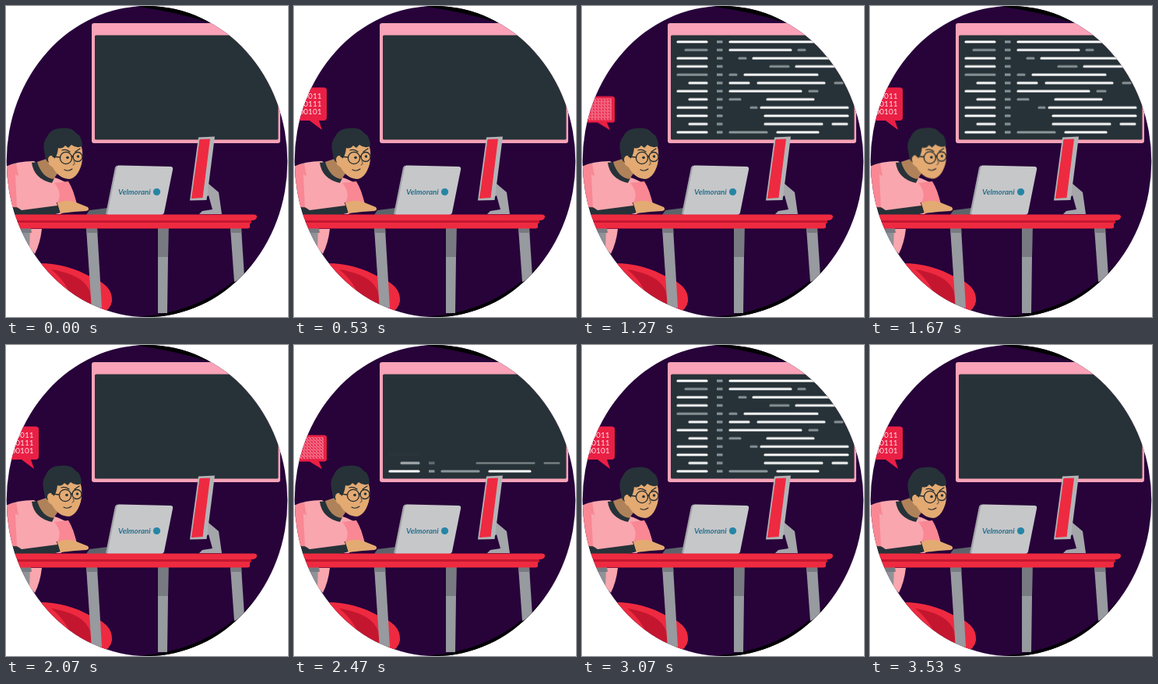
An HTML page without scripts that plays this animation: 362x399 px, repeating every 3.59 s.

```html
<!DOCTYPE html>
<html lang="en">
<head>
<meta charset="utf-8">
<title>Coder at a desk</title>
<style>
  html, body { margin: 0; width: 100%; height: 100%; overflow: hidden; background: #fff; }
  svg { display: block; width: 100%; height: 100%; }

  .w, .g { fill: none; stroke-width: 3.2; stroke-linecap: round; }
  .w { stroke: #fff; }
  .g { stroke: #8c9599; }
  .red { fill: #ee2a40; }
  .deep { fill: #c4172f; }
  .skin { fill: #e3aa72; }
  .shirt { fill: #f9a6ae; }
  .shade { fill: #f98794; }
  .dark { fill: #263238; }
  .ink { fill: none; stroke: #222b31; stroke-linecap: round; }
  .digits { font: 10px Lato, sans-serif; fill: #ffdfe5; text-anchor: end; }
  .brand { font: italic 700 9.8px Lato, sans-serif; fill: #28708c; }

  /* code lines: written bottom to top, wiped at once */
  .code { animation: wipe 1795ms step-end infinite; }
  .row { animation: show 1795ms calc(var(--i) * 50ms) linear infinite backwards; }
  .row .end {
    transform-box: fill-box; transform-origin: center;
    animation: grow 1795ms calc(var(--i) * 50ms) linear infinite backwards;
  }
  @keyframes wipe { 0%, 96.6% { visibility: hidden; } 31.9% { visibility: visible; } }
  @keyframes show { 0%, 32% { opacity: 0; } 34.8% { opacity: .6; } 35.6%, 100% { opacity: 1; } }
  @keyframes grow { 0%, 33% { transform: scaleY(0); } 36.5%, 100% { transform: none; } }

  /* speech bubble: pops up from its tail, then shows digits */
  .bubble { transform-origin: 33px 160px; animation: pop 1196.67ms linear infinite; }
  .noise { animation: noise 1196.67ms step-end infinite; }
  .digits { animation: digits 1196.67ms step-end infinite; }
  @keyframes pop {
    0%, 5% { transform: scaleY(0); }
    5.01% { transform: scaleY(.78); }
    6.3% { transform: scaleY(.8); }
    18%, 100% { transform: none; }
  }
  @keyframes noise { 0% { opacity: 1; } 22% { opacity: 0; } }
  @keyframes digits { 0% { opacity: 0; } 22% { opacity: 1; } }

  .head { animation: nod 3590ms ease-in-out infinite; }
  @keyframes nod {
    0%, 42%, 82%, 100% { transform: none; }
    56%, 70% { transform: translate(-1px, -2px); }
  }
</style>
</head>
<body>
<svg viewBox="0 0 362 399" preserveAspectRatio="none">
  <defs>
    <clipPath id="stage"><ellipse cx="181" cy="199.5" rx="180.3" ry="199.5"/></clipPath>
    <clipPath id="glass"><path d="M114 38H349V171H114Z"/></clipPath>
    <pattern id="hatch" width="4" height="5" patternUnits="userSpaceOnUse">
      <path d="M0 1L4 4M0 4L2 5" fill="none" stroke="#f9a0b2" stroke-width="1.2"/>
    </pattern>
    <path id="tag" class="g" style="stroke-linecap:butt" d="M173 0H180.500"/>
    <path id="wide" class="w" d="M123 0H160"/>
    <path id="short" class="w" d="M138 0H160"/>
  </defs>

  <g clip-path="url(#stage)">
    <path fill="#27033a" d="M0 0H362V399H0Z"/>
    <path d="M165 0A180.3 199.5 0 0 1 264 22Q216 7 165 0ZM165 399A180.3 199.5 0 0 0 320 326Q262 394 165 399Z"/>

    <!-- wall screen -->
    <rect x="110" y="22" width="242" height="154" rx="3" fill="#f9a2b8"/>
    <rect x="114" y="37.500" width="235.500" height="134" rx="1.5" class="dark"/>
    <g clip-path="url(#glass)"><g class="code">
      <g transform="translate(0 162)"><g class="row" style="--i:0"><use href="#wide"/><use href="#tag"/>
        <path class="g" d="M190 0H237"/><path class="w end" d="M251 0H303"/></g></g>
      <g transform="translate(0 151.4)"><g class="row" style="--i:1"><use href="#short"/><use href="#tag"/>
        <path class="w end" d="M235 0H308M322 0H340"/></g></g>
      <g transform="translate(0 140.9)"><g class="row" style="--i:2"><use href="#wide"/><use href="#tag"/>
        <path class="w end" d="M235 0H341"/></g></g>
      <g transform="translate(0 130.4)"><g class="row" style="--i:3"><use href="#wide"/><use href="#tag"/>
        <path class="g" d="M217 0H224"/><path class="w end" d="M230 0H341"/></g></g>
      <g transform="translate(0 119.8)"><g class="row" style="--i:4"><use href="#short"/><use href="#tag"/>
        <path class="g" d="M190 0H203"/><path class="w end" d="M238 0H297"/></g></g>
      <g transform="translate(0 109.3)"><g class="row" style="--i:5"><use href="#wide"/><use href="#tag"/>
        <path class="w end" d="M190 0H281"/><path class="g" d="M292 0H302"/></g></g>
      <g transform="translate(0 98.7)"><g class="row" style="--i:6"><use href="#short"/><use href="#tag"/>
        <path class="w end" d="M190 0H214M226 0H311"/><path class="g" d="M325 0H334"/></g></g>
      <g transform="translate(0 88.2)"><g class="row" style="--i:7"><path class="g" d="M123 0H160"/><use href="#tag"/>
        <path class="g" d="M190 0H198"/><path class="w end" d="M209 0H302"/></g></g>
      <g transform="translate(0 77.6)"><g class="row" style="--i:8"><use href="#wide"/><use href="#tag"/>
        <path class="g" d="M242 0H265"/><path class="w end" d="M275 0H342"/></g></g>
      <g transform="translate(0 67.1)"><g class="row" style="--i:9"><use href="#wide"/><use href="#tag"/>
        <path class="g" d="M202 0H210"/><path class="w end" d="M220 0H321"/></g></g>
      <g transform="translate(0 56.5)"><g class="row" style="--i:10"><path class="g" d="M133 0H160"/><use href="#tag"/>
        <path class="w end" d="M190 0H268"/><path class="g" d="M278 0H286"/></g></g>
      <g transform="translate(0 46)"><g class="row" style="--i:11"><use href="#wide"/><use href="#tag"/>
        <path class="w end" d="M190 0H308"/></g></g>
    </g></g>

    <!-- bubble -->
    <g class="bubble">
      <path fill="#ea1f44" d="M0 104.500H38Q42 104.500 42 108V143Q42 147 38 147H32L36 159L20 147H0Z"/>
      <path class="noise" fill="url(#hatch)" d="M8 108H38V143H8Z"/>
      <g class="digits">
        <text x="35.500" y="118.500">00011</text>
        <text x="35.500" y="128.500">00111</text>
        <text x="35.500" y="138.500">00101</text>
      </g>
    </g>

    <!-- chair -->
    <path class="red" d="M36 330C66 329 88 336 108 347C130 356 137 366 136 379Q134 391 122 393L110 399H30Z"/>
    <path class="deep" d="M58 338C84 342 108 352 109 374L110 399H92Q84 358 58 338Z"/>

    <!-- person -->
    <path fill="#8f9398" d="M18 286H32L35 314H25Z"/>
    <path class="shirt" d="M31 286H46Q44 304 37 318L30 311Z"/>
    <path class="shirt" d="M0 206Q14 199 36 199L62 220Q82 226 86 238L91 254L70 267H8Z"/>
    <path class="shade" d="M62 227L80 225Q87 236 91 256L66 252Q73 240 62 227Z"/>
    <path class="shade" d="M0 206L13 202Q20 230 14 262H6L0 240Z"/>
    <path class="dark" d="M33 201L42 200Q48 219 62 221L59 227Q36 222 33 201Z"/>
    <path fill="#b0825a" d="M40 200L58 194L66 215L61 222Q46 220 40 200Z"/>
    <path class="dark" d="M8 258L30 259L66 252L70 265L60 268H10Z"/>
    <path class="shirt" d="M12 216Q26 224 30 246L64 250L66 256L20 262L14 258Z"/>
    <path class="skin" d="M66 253Q78 247 90 252L105 258Q108 262 103 263L88 264L70 266Z"/>

    <g class="head">
      <path class="skin" d="M58 178L96 177Q100 190 97 203Q92 220 82 222Q68 222 60 207Q52 203 54 194Z"/>
      <path class="dark" d="M50 191Q46 176 52 169Q57 157 70 157Q84 155 90 163Q98 167 98 180Q90 183 84 178L80 182L76 179Q72 184 67 182Q66 192 62 196Q57 190 55 201Q50 198 50 191Z"/>
      <ellipse cx="58" cy="197" rx="4" ry="5" class="skin"/>
      <g class="ink" stroke-width="1.3">
        <circle cx="77" cy="195" r="7.6"/>
        <circle cx="92" cy="193.500" r="6"/>
        <path d="M60 193L69 194M84.500 193H86.500M72 185Q77 183 82 187M89 187L95 183"/>
        <path stroke-width="1.1" d="M75 210Q80 213 85 209"/>
      </g>
      <circle cx="79" cy="194.500" r="1.8" class="dark"/>
      <circle cx="92.500" cy="193" r="1.7" class="dark"/>
      <path class="ink" stroke-width=".8" d="M87 199Q90 203 86 204"/>
    </g>

    <!-- laptop -->
    <path fill="#5d646a" d="M107 262L131 259V268H103Z"/>
    <path fill="#a1a3a7" d="M140 207Q141 204 145 204.500L150 206L136 267H128Z"/>
    <path fill="#c6c7c9" d="M142 208Q143 204.500 147 204.600L211 206Q215 206 214 210L203 265Q202 268 199 268H130Z"/>
    <text class="brand" x="144" y="242">Velmorani</text>
    <circle cx="193.500" cy="238.500" r="4.600" fill="#2585a5"/>

    <!-- monitor -->
    <path fill="#a4a6aa" d="M260 228L273 239L277 267H248L252 263L265 261L260 243L256 246Z"/>
    <path fill="#b2b4b7" d="M247 168.500L268 167.500L257.500 249L236 249.500Z"/>
    <path class="red" d="M248.500 171L262 170.500L252.500 246L238 247Z"/>

    <!-- table -->
    <g fill="#979a9e">
      <path d="M103 285H117L123 387L110 390Z"/>
      <path d="M195 285H208.500L207 394H195Z"/>
      <path d="M288 285H302L306 348L293 354Z"/>
    </g>
    <path fill="#777b81" d="M18 285H32L33 291H19ZM103 285H117L117.500 291H103.500ZM195 285H208.500L208 322H195ZM288 285H302L302.500 291H288.500Z"/>
    <path class="deep" d="M10 273H315V279H10Z"/>
    <path class="red" d="M10 278H313V283Q313 285.500 310 285.500H10Z"/>
    <path class="red" d="M8 267.500H318Q322 267.500 322 270V271Q321 275 316 275H8Z"/>
  </g>
</svg>
</body>
</html>
```
